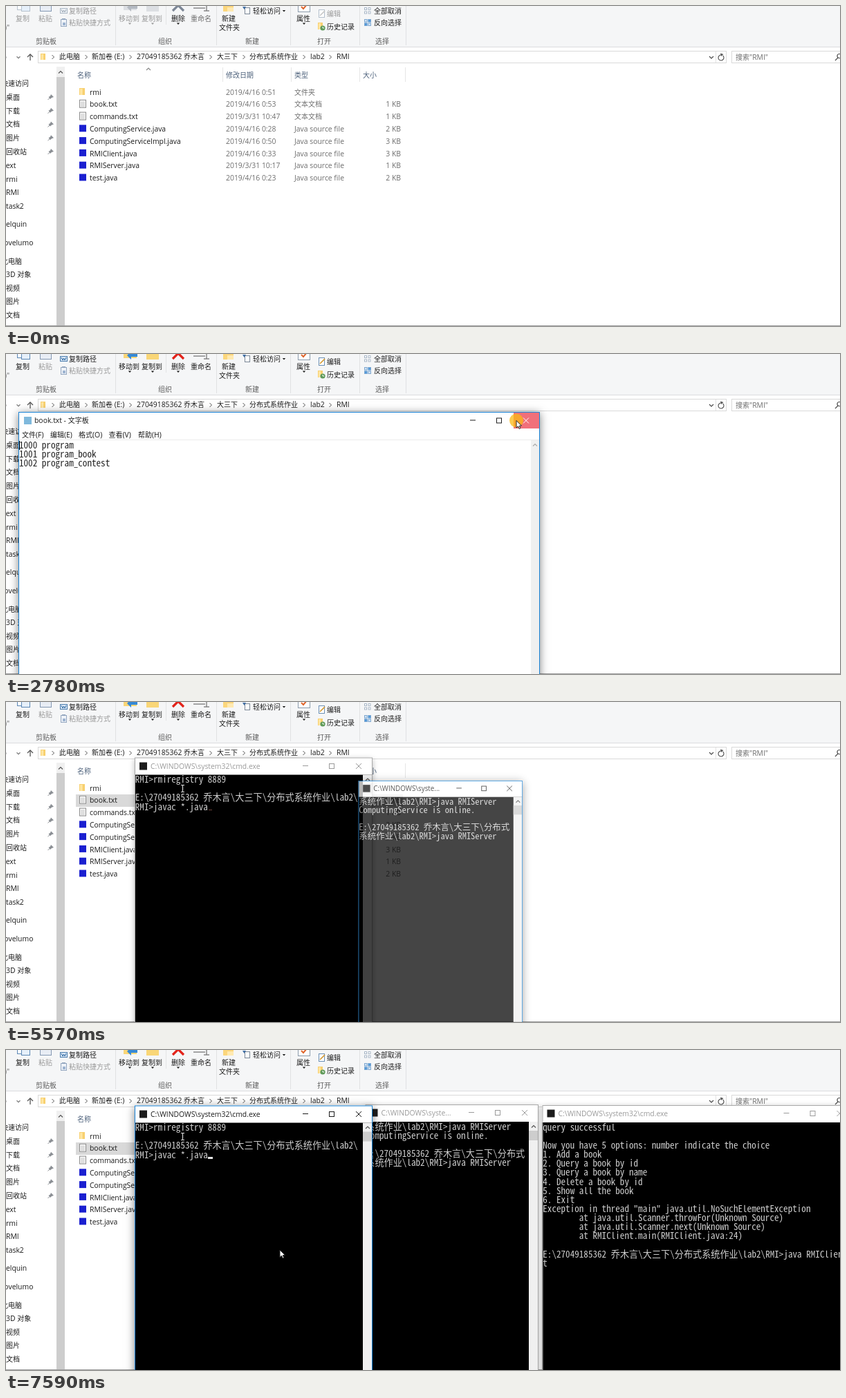
These frames come from a looping animation (1206 px wide and 464 px high, 8000 ms). An HTML page with a canvas:

```html
<!DOCTYPE html>
<html lang="zh">
<head>
<meta charset="utf-8">
<style>
html, body { margin: 0; width: 100%; height: 100%; overflow: hidden; background: #fff; }
canvas { display: block; }
</style>
</head>
<body>
<canvas id="stage" width="1206" height="464"></canvas>
<script>
const W = 1206, H = 464, LOOP = 8000;
const stage = document.getElementById('stage').getContext('2d');
const layer = Object.assign(document.createElement('canvas'), { width: W, height: H }).getContext('2d');
let g = stage;

const UI = '"Open Sans", "Noto Sans", "Noto Sans CJK SC", "Noto Sans CJK", sans-serif';
const CJK = '"Noto Sans CJK SC", "Noto Sans CJK", sans-serif';
const MONO = '"Noto Sans Mono CJK SC", "Liberation Mono", monospace';
const CELL = 6.57, LINE = 13.15;
g.font = `100px ${MONO}`;
const monoSize = CELL * 100 / g.measureText('0').width;

const USER = '27049185362 乔木言';
const INK = '#1b1b1b', GREY = '#6d6d6d', DIM = '#9a9a9a', BLUE = '#1883d7';

// ---------- helpers ----------
const runs = s => s.match(/[\u2e80-\u9fff]+|[^\u2e80-\u9fff]+/g) || [];
const isHan = s => /[\u2e80-\u9fff]/.test(s);

function text(s, x, y, color = INK, right = false) {
  const font = r => isHan(r) ? `10px ${CJK}` : `10.4px ${UI}`;
  const width = r => (g.font = font(r), g.measureText(r).width);
  if (right) x -= runs(s).reduce((sum, r) => sum + width(r), 0);
  g.fillStyle = color;
  for (const r of runs(s)) {
    const w = width(r);
    g.fillText(r, x, y + 3.7);
    x += w;
  }
}

function mono(lines, x, y, color) {
  g.fillStyle = color;
  lines.forEach((line, i) => {
    let cx = x;
    for (const r of runs(line)) {
      g.font = isHan(r) ? `${CELL * 2}px ${CJK}` : `${monoSize}px ${MONO}`;
      g.fillText(r, cx, y + i * LINE + 4.6);
      cx += r.length * CELL * (isHan(r) ? 2 : 1);
    }
  });
}

function rect(x, y, w, h, fill, line) {
  if (fill) { g.fillStyle = fill; g.fillRect(x, y, w, h); }
  if (line) { g.strokeStyle = line; g.lineWidth = 1; g.strokeRect(x + .5, y + .5, w - 1, h - 1); }
}

function path(color, width, pts, fill) {
  g.beginPath();
  for (let i = 0; i < pts.length; i += 2) g.lineTo(pts[i], pts[i + 1]);
  if (fill) { g.closePath(); g.fillStyle = fill; g.fill(); }
  if (width) { g.strokeStyle = color; g.lineWidth = width; g.stroke(); }
}

function circle(x, y, r, fill) {
  g.beginPath();
  g.arc(x, y, r, 0, 7);
  g.fillStyle = fill;
  g.fill();
}

const chevron = (x, y) => path('#555', 1, [x - 1.5, y - 3, x + 1.5, y, x - 1.5, y + 3]);
const caretDown = (x, y, c = '#444', s = 3) => path(c, 1.1, [x - s, y - s / 2, x, y + s / 2, x + s, y - s / 2]);
const caretUp = (x, y, c = '#555', s = 3) => path(c, 1.2, [x - s, y + s / 2, x, y - s / 2, x + s, y + s / 2]);
const dropMark = (x, y, c) => path('', 0, [x - 2.2, y - 1, x + 2.2, y - 1, x, y + 1.5], c);

function folder(x, y, w = 8, h = 10) {
  rect(x, y, w, h, '#f8d06f');
  rect(x + 1, y + 1, w * .45, h - 1, '#ffe6a3');
}

function page(x, y, w = 10, h = 12, line = '#8a8a8a') {
  rect(x, y, w, h, '#fafafa', line);
  for (let i = 3; i < h - 2; i += 2) rect(x + 2, y + i, w - 4, 1, '#c4c4c4');
}

// ---------- explorer ----------
const files = [
  ['rmi', '2019/4/16 0:51', '文件夹', ''],
  ['book.txt', '2019/4/16 0:53', '文本文档', '1 KB'],
  ['commands.txt', '2019/3/31 10:47', '文本文档', '1 KB'],
  ['ComputingService.java', '2019/4/16 0:28', 'Java source file', '2 KB'],
  ['ComputingServiceImpl.java', '2019/4/16 0:50', 'Java source file', '3 KB'],
  ['RMIClient.java', '2019/4/16 0:33', 'Java source file', '3 KB'],
  ['RMIServer.java', '2019/3/31 10:17', 'Java source file', '1 KB'],
  ['test.java', '2019/4/16 0:23', 'Java source file', '2 KB']
];
const ROW = 17.78, ROW0 = 116;

function ribbon(on) {
  const c = on ? INK : DIM;
  rect(0, 0, W, 60, '#f5f6f7');
  rect(0, 59, W, 1, '#dcdddf');
  for (const x of [158, 304, 411, 511, 578]) rect(x, 0, 1, 57, '#e0e1e3');
  rect(231, 0, 1, 27, '#e3e4e6');
  [['剪贴板', 43], ['组织', 220], ['新建', 346], ['打开', 450], ['选择', 534]]
    .forEach(([s, x]) => text(s, x, 51, '#5c5c5c'));

  rect(16, -4, 11, 10, '#fff', on ? '#5b87b5' : '#b5c1cd');
  rect(22, -2, 13, 10, '#e6f0fa', on ? '#5b87b5' : '#b5c1cd');
  rect(49, -4, 17, 12, '#e8edf5', '#8599b3');
  text('复制', 14, 18, c);
  text('粘贴', 47, 18, DIM);
  text(')"', -2, 31, GREY);
  rect(78, 3, 11, 8, on ? '#dbe8f6' : '#eef2f6', on ? '#4b7dad' : '#aab7c4');
  path(on ? '#23619c' : '#9aa7b4', 1, [80, 5, 82, 9, 83.5, 6, 85, 9, 87, 5]);
  text('复制路径', 91, 7, c);
  rect(79, 19, 9, 11, '#eef2f8', '#93a6bf');
  rect(81, 18, 5, 2, '#93a6bf');
  rect(82, 24, 4, 4, '#9db4d0');
  text('粘贴快捷方式', 91, 24, DIM);

  const fold = on ? '#f9d677' : '#dcdfe3';
  rect(170, -2, 19, 8, fold);
  path('', 0, [175, 2, 181, -4, 181, 0, 190, 0, 190, 4, 181, 4, 181, 8], on ? '#3689d6' : '#b4bac2');
  rect(203, -2, 18, 10, fold);
  text('移动到', 163, 18, c);
  text('复制到', 196, 18, c);
  path(on ? '#e2231a' : '#7d8796', 3.2, [241, 7, 249, -1, 257, 7]);
  text('删除', 239, 18, INK);
  path('#777', 1.3, [271, 3, 288, 3]);
  path('#777', 1.3, [290, -2, 290, 7]);
  path('#777', 1.3, [286, 7, 294, 7]);
  text('重命名', 267, 18, on ? INK : GREY);
  [[179, c], [212, c], [249, INK], [431, INK]].forEach(([x, k]) => dropMark(x, 25.5, k));

  rect(314, -2, 15, 10, '#fbd67c');
  rect(320, 2, 9, 6, '#ffe9b0');
  text('新建', 312, 18);
  text('文件夹', 308, 31);
  rect(345, 2, 8, 10, '#fff', '#7a8796');
  path('', 0, [342, 1, 347, 1, 344.5, 5], '#3f6fa5');
  text('轻松访问', 357, 7);
  dropMark(402, 7, INK);

  rect(422, -3, 18, 12, '#fff', '#8c9bab');
  path('#e0652b', 2, [427, 1, 430, 4, 435, -2]);
  text('属性', 420, 18);
  rect(452, 5, 9, 12, '#fff', on ? '#6b8fb5' : '#b3bfcc');
  path(on ? '#d3962b' : '#c5c5c5', 1.6, [454, 14, 461, 7]);
  text('编辑', 464, 11, c);
  folder(451, 24, 7, 10);
  circle(458, 32, 3.6, '#5f9a5a');
  path('#fff', 1, [458, 30, 458, 32, 460, 32]);
  text('历史记录', 464, 30);
  for (let i = 0; i < 4; i++) {
    const x = 518 + i % 2 * 5.5, y = 2 + (i >> 1) * 5.5;
    rect(x, y, 4, 4, '#fff', '#a8b6c6');
    rect(x, y + 17, 4.5, 4.5, i === 1 || i === 2 ? '#4d97db' : '#d7e7f6', '#7fa8d0');
  }
  text('全部取消', 532, 7);
  text('反向选择', 532, 24);
}

function addressBar() {
  rect(46, 65, 996, 18, '#fff', '#d9d9d9');
  rect(1026, 66, 1, 16, '#e2e2e2');
  rect(1049, 65, 170, 18, '#fff', '#d9d9d9');
  path('#aaa', 1, [-3, 71, 1, 74.5, -3, 78]);
  caretDown(18, 74.5, '#777', 2.5);
  path('#555', 1.3, [35, 79, 35, 70]);
  path('#555', 1.3, [31, 74, 35, 70, 39, 74]);
  folder(50, 69, 7, 9);
  for (const x of [68, 116, 180, 296, 344, 431, 469]) chevron(x, 74);
  [['此电脑', 77], ['新加卷 (E:)', 124], [USER, 189], ['大三下', 305], ['分布式系统作业', 352], ['lab2', 440], ['RMI', 478]]
    .forEach(([s, x]) => text(s, x, 73.5));
  caretDown(1020, 74.5);
  g.beginPath();
  g.arc(1034, 75, 4, -.9, 4.6);
  g.strokeStyle = '#555';
  g.lineWidth = 1.2;
  g.stroke();
  path('', 0, [1033, 68.5, 1037.5, 70, 1034, 73], '#555');
  text('搜索"RMI"', 1055, 74, GREY);
  g.beginPath();
  g.arc(1205, 72.5, 3, 0, 7);
  g.stroke();
  path('#555', 1.3, [1203, 75, 1199, 79]);
}

function navPane() {
  [['快速访问', -7, 112], ['桌面', 0, 132], ['下载', 0, 152], ['文档', 0, 171.5], ['图片', 0, 191],
   ['回收站', 0, 211], ['text', -4, 231], ['rmi', 0, 251], ['RMI', 0, 270.5], ['task2', 0, 290],
   ['Zelquin', -6, 316.5], ['Fovelumo', -8, 343], ['此电脑', -7, 370], ['3D 对象', 0, 389],
   ['视频', 0, 409], ['图片', 0, 428.5], ['文档', 0, 448]].forEach(a => text(...a));
  for (let y = 132; y < 215; y += 19.75) {
    path('', 0, [65, y - 4, 69, y, 66, y + 1, 64, y + 3, 61.5, y, 64, y - 1.5], '#8b8f94');
    path('#8b8f94', 1, [63, y + 1.5, 60.5, y + 4]);
  }
  rect(73, 88, 12, 376, '#f0f0f0');
  rect(73, 103, 12, 361, '#cdcdcd');
  caretUp(79, 96);
}

function fileList(hover, selection) {
  for (const x of [313, 412, 511, 577]) rect(x, 89, 1, 21, '#e5e5e5');
  [['名称', 103], ['修改日期', 318], ['类型', 417], ['大小', 516]]
    .forEach(([s, x]) => text(s, x, 100, '#4c607a'));
  caretUp(206, 91.5, '#888');
  if (hover >= 0) rect(101, Math.round(ROW0 + hover * ROW), 473, 18, '#e5f3ff');
  if (selection === 'active') rect(101, 134, 473, 18, '#cce8ff', '#99d1ff');
  if (selection === 'idle') rect(101, 134, 473, 18, '#d9d9d9');
  files.forEach(([name, date, kind, size], i) => {
    const y = 125 + i * ROW;
    if (i === 0) folder(106, y - 6, 8, 10);
    else if (i < 3) page(106, y - 7);
    else rect(106, y - 6, 10, 10, '#1a1fd0');
    text(name, 121, y);
    text(date, 318, y, GREY);
    text(kind, 417, y, GREY);
    text(size, 571, y, GREY, true);
  });
}

function explorer(t, cur) {
  rect(0, 0, W, H, '#fff');
  ribbon(t >= 1360);
  addressBar();
  navPane();
  const inList = cur && t < 980 && cur.x > 101 && cur.x < 574;
  const row = inList ? Math.floor((cur.y - ROW0) / ROW) : -1;
  fileList(row < files.length ? row : -1, t < 980 ? '' : t < 3790 ? 'active' : 'idle');
  rect(0, 463, W, 1, '#a0a0a0');
}

// ---------- windows ----------
function frame({ x, y, w, title, titleY }, active, closeFill) {
  g.save();
  g.shadowColor = active ? 'rgba(0,0,0,.5)' : 'rgba(0,0,0,.28)';
  g.shadowBlur = active ? 12 : 8;
  g.shadowOffsetY = 2;
  rect(x, y, w, 560, '#fff');
  g.restore();
  const r = x + w, c = active ? INK : DIM;
  if (closeFill) rect(r - 38, y, 38, 24, closeFill);
  text(title, x + 23, titleY, c);
  path(c, 1, [r - 101, titleY - .5, r - 93, titleY - .5]);
  rect(r - 63, titleY - 4, 8, 8, null, c);
  const k = closeFill ? '#fff' : c, cx = r - 20, d = 4;
  path(k, 1, [cx - d, titleY - d, cx + d, titleY + d]);
  path(k, 1, [cx - d, titleY + d, cx + d, titleY - d]);
}

const border = ({ x, y, w }, active) => rect(x, y, w, 560, null, active ? BLUE : '#a9a9a9');

function notepad(t, cur) {
  const w = { x: 18, y: 84, w: 754, title: 'book.txt - 文字板', titleY: 96.5 };
  const overClose = cur && cur.x > 734 && cur.y < 108;
  frame(w, true, overClose ? (t >= 2780 ? '#f1707a' : '#e81123') : null);
  rect(26, 91, 11, 11, '#7fb9dc');
  [['文件(F)', 23], ['编辑(E)', 64], ['格式(O)', 105], ['查看(V)', 148.5], ['帮助(H)', 191]]
    .forEach(([s, x]) => text(s, x, 117));
  rect(19, 124, 752, 1, '#ececec');
  rect(759, 125, 12, 400, '#f0f0f0');
  caretUp(765, 132, '#aaa');
  mono(['1000 program', '1001 program_book', '1002 program_contest'], 19, 132.5, '#222');
  if ((t - 1600) % 1060 < 530 || t >= 2660) rect(19, 126, 1, 13, '#000');
  border(w, true);
}

function terminal(w, active, extra) {
  frame(w, active);
  rect(w.x + 7, w.titleY - 5.5, 11, 11, '#1c1c1c');
  rect(w.x, w.y + 25, w.w, 535, '#000');
  const sx = w.x + w.w - 14;
  rect(sx, w.y + 25, 14, 535, '#f0f0f0');
  rect(sx, w.y + 38, 14, 14, '#cdcdcd');
  caretUp(sx + 7, w.y + 32);
  mono(w.lines, w.x + .8, w.y + 32, '#cfcfcf');
  if (extra) extra();
  border(w, active);
}

const CMD = 'C:\\WINDOWS\\system32\\cmd.exe', HOME = `E:\\${USER}\\大三下\\分布式`;
const registry = { x: 186, y: 80.5, w: 344, title: CMD, titleY: 93,
  lines: ['RMI>rmiregistry 8889', '', HOME + '系统作业\\lab2\\', 'RMI>javac *.java'] };
const server = { x: 519.5, y: 79, w: 250.5, title: 'C:\\WINDOWS\\syste...', titleY: 91,
  lines: ['系统作业\\lab2\\RMI>java RMIServer', 'ComputingService is online.', '', HOME,
    '系统作业\\lab2\\RMI>java RMIServer'] };
const client = { x: 775.5, y: 80, w: 450, title: CMD, titleY: 92,
  lines: ['query successful', '', 'Now you have 5 options: number indicate the choice',
    '1. Add a book', '2. Query a book by id', '3. Query a book by name', '4. Delete a book by id',
    '5. Show all the book', '6. Exit',
    'Exception in thread "main" java.util.NoSuchElementException',
    '        at java.util.Scanner.throwFor(Unknown Source)',
    '        at java.util.Scanner.next(Unknown Source)',
    '        at RMIClient.main(RMIClient.java:24)', '',
    HOME + '系统作业\\lab2\\RMI>java RMIClien', 't'] };

// Steps are [time, opacity, scale]; the window grows towards its place around (ax, ay).
function animated(t, ax, ay, steps, draw) {
  const step = steps.filter(s => t >= s[0]).pop();
  if (!step || !step[1]) return;
  const [, alpha, k] = step;
  layer.setTransform(1, 0, 0, 1, 0, 0);
  layer.clearRect(0, 0, W, H);
  layer.setTransform(k, 0, 0, k, ax * (1 - k), ay * (1 - k));
  g = layer;
  draw();
  g = stage;
  g.globalAlpha = alpha;
  g.drawImage(layer.canvas, 0, 0);
  g.globalAlpha = 1;
}

const showNotepad = (t, cur) => animated(t, 395, 352,
  [[1520, .2, .959], [1600, .75, .987], [1680, 1, 1], [2860, .65, .98], [2940, .25, .95], [3010, .07, .93], [3090, 0, .9]],
  () => notepad(t, cur));

const showRegistry = t => animated(t, 427, 770,
  [[4330, .4, .94], [4430, .855, .971], [4510, 1, 1]],
  () => terminal(registry, t < 4810 || t >= 7100, () => {
    beam(255.5, 125.5, '#d8d8d8');
    if (t >= 7590) rect(292, 155, 7, 3, '#e6e6e6');
    else if (t >= 4810) rect(293, 156, 5, 1, '#6b4038');
  }));

const showServer = t => animated(t, 328, 752,
  [[5570, .725, .948], [5650, .95, .987], [5730, 1, 1]],
  () => terminal(server, t < 6060));

const showClient = t => animated(t, 347, 509,
  [[6720, .7, .955], [6810, .97, .993], [6890, 1, 1]],
  () => terminal(client, t < 7100));

// ---------- pointer ----------
function beam(x, y, color) {
  path(color, 1, [x - 2.5, y - 5, x + 2.5, y - 5]);
  path(color, 1, [x - 2.5, y + 5, x + 2.5, y + 5]);
  path(color, 1.2, [x, y - 5, x, y + 5]);
}

function arrow(x, y) {
  const shape = [0, 0, 0, 10.5, 2.5, 8.3, 4.2, 12, 5.9, 11.2, 4.3, 7.7, 7.5, 7.5];
  path('#222', 1, shape.map((v, i) => v + (i % 2 ? y : x)).concat(x, y), '#fff');
}

const progress = (t, from, to) => Math.min(1, Math.max(0, Math.floor((t - from) / 75) * 75 / (to - from)));
const smooth = u => (1 - Math.cos(Math.PI * u)) / 2;
const mix = (a, b, u) => a + (b - a) * u;

function cursorAt(t) {
  if (t >= 6720) {
    const u = smooth(progress(t, 6810, 7035));
    return { x: mix(416, 396, u), y: mix(403, 290, u) };
  }
  if (t < 130 || t >= 3010) return null;
  if (t < 1680) {
    const u = progress(t, 130, 730), v = u - 1;
    return { x: mix(1068, 180, 1 - v * v), y: mix(448, 142, 1 + 2.2 * v ** 3 + 1.2 * v * v), beam: t >= 1520 };
  }
  const u = smooth(progress(t, 1680, 2630)), x = mix(180, 738, u), y = mix(142, 96.5, u);
  return { x, y, beam: y > 125 && x < 758 };
}

const clicks = [[980, 1050], [1130, 1200], [2780, 2860], [7100, 7180]];

function drawCursor(t, c) {
  if (!c) return;
  if (clicks.some(([a, b]) => t >= a && t < b)) circle(c.x, c.y, 10, 'rgba(250,185,20,.75)');
  if (c.beam) beam(c.x, c.y, '#333');
  else arrow(c.x, c.y);
}

// ---------- loop ----------
function render(t) {
  const cur = cursorAt(t);
  explorer(t, cur);
  showNotepad(t, cur);
  const order = t < 7100 ? [showRegistry, showServer, showClient] : [showServer, showClient, showRegistry];
  order.forEach(show => show(t));
  drawCursor(t, cur);
}

const start = performance.now();
function tick() {
  render((performance.now() - start) % LOOP);
  requestAnimationFrame(tick);
}
tick();
</script>
</body>
</html>
```
